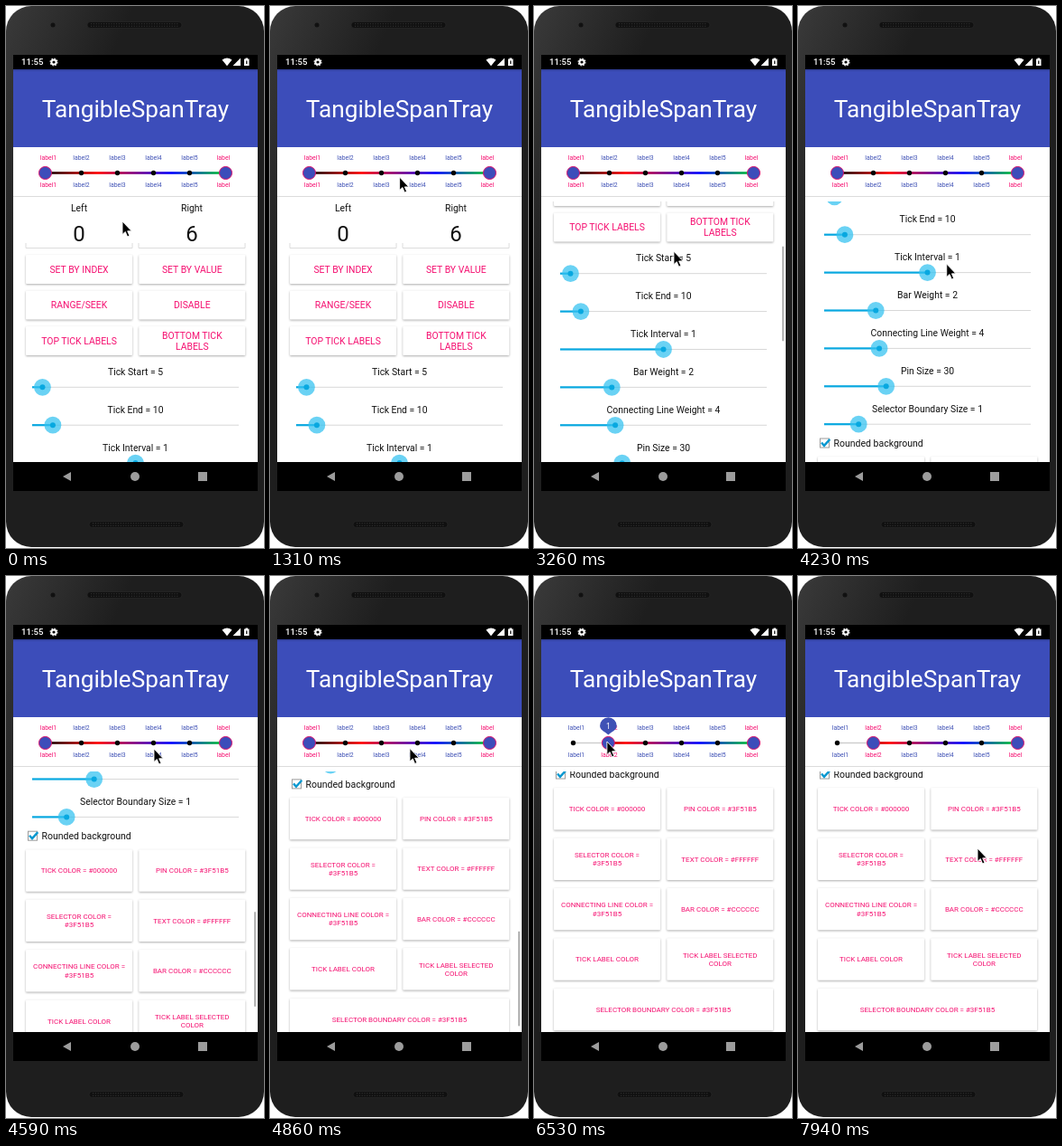
Recreate the animation shown at these times as an HTML page. Size 286 by 599 pixels, loop 8000 ms.

```html
<!DOCTYPE html>
<html lang="en">
<head>
<meta charset="utf-8">
<title>Range slider demo</title>
<style>
html, body { margin: 0; width: 100%; height: 100%; overflow: hidden; background: #fff; }
svg { display: block; width: 286px; height: 599px; font-family: Roboto, "Liberation Sans", sans-serif; }
.card { fill: #fff; filter: drop-shadow(0 1px 1px rgba(0, 0, 0, .32)); }
.ink { fill: #111; }
.pink { fill: #f50f70; }
.blue { fill: #3f51b5; }
.header { fill: #3c4dba; }
.white { fill: #fff; }
.cyan { fill: #08a8e0; }
.nav { fill: #9c9c9c; }
</style>
</head>
<body>
<svg id="stage" viewBox="0 0 286 599" xmlns="http://www.w3.org/2000/svg"></svg>
<script>
const LOOP = 8000;
const BEAT = 88.2;
const BAR_Y = 184.5, BAR_LEFT = 43.5, TICK_GAP = 40;
const VIEW_TOP = 216, VIEW_BOTTOM = 504;

// Times below are in beats.
const flings = [
  { start: 18, length: 4, distance: 110.5 },
  { start: 36.7, length: 5, distance: 100 },
  { start: 48, length: 10, distance: 264 }
];

// Each glide: start, end, then the point it reaches.
const glides = [
  [0, 2, 138, 263], [4, 5, 137, 259], [9, 16, 144, 185], [18, 22, 144.5, 112],
  [25, 34, 158, 353], [35, 38.5, 153, 218], [40, 46, 165, 318], [46, 52, 164, 191],
  [54, 60, 42, 183], [65, 75, 82, 183], [82, 86, 250, 192], [87, 90, 199, 301]
];

const clamp = (v, lo, hi) => Math.min(hi, Math.max(lo, v));
const ramp = (t, from, to) => clamp((t - from) / (to - from), 0, 1);
const smooth = p => p * p * (3 - 2 * p);
const decelerate = p => 1 - (1 - p) ** 2.65;

function cursorAt(t) {
  let x = 129, y = 238;
  for (const [from, to, toX, toY] of glides) {
    const p = smooth(ramp(t, from, to));
    x += (toX - x) * p;
    y += (toY - y) * p;
  }
  return [x, y];
}

const scrollAt = t => flings.reduce((sum, f) =>
  sum + f.distance * decelerate(ramp(t, f.start, f.start + f.length)), 0);

// The scrollbar shows during a fling, lingers, then fades.
function scrollbarAt(t) {
  const f = flings.findLast(f => t > f.start);
  if (!f) return 0;
  const end = f.start + f.length;
  return 1 - ramp(t, end + 3, end + 6);
}

// y is the middle of the capitals
const text = (x, y, str, size, cls, extra = 'text-anchor="middle"') =>
  `<text x="${x}" y="${y + size * 0.36}" font-size="${size}" class="${cls}" ${extra}>${str}</text>`;

const rect = (x, y, w, h, attrs) =>
  `<rect x="${x}" y="${y}" width="${w}" height="${h}" ${attrs}/>`;

const circle = (x, y, r, attrs) => `<circle cx="${x}" cy="${y}" r="${r}" ${attrs}/>`;

const range = n => [...Array(n).keys()];

function button(x, y, w, h, label, size) {
  const lines = label.split('|');
  const gap = size * 1.17;
  return rect(x, y, w, h, 'rx="1" class="card"') + lines.map((line, i) =>
    text(x + w / 2, y + h / 2 + (i - (lines.length - 1) / 2) * gap, line, size, 'pink')).join('');
}

const buttonRow = (labels, y, h, size) =>
  labels.map((s, i) => button(22 + 125.3 * i, y, 118, h, s, size)).join('');

function seek([name, value, max], i) {
  const y = 421.3 + 41.9 * i;
  const filled = 229 * value / max;
  return text(143.5, y - 17, `${name} = ${value}`, 10.4, 'ink') +
    rect(29, y - 0.5, 229, 1, 'fill="#d8d8d8"') +
    rect(29, y - 1.1, filled, 2.2, 'class="cyan"') +
    circle(29 + filled, y, 9.4, 'fill="#30c0f0" fill-opacity=".72"') +
    circle(29 + filled, y, 3, 'class="cyan"');
}

function numberBox(x, label, value) {
  return `<path d="M${x - 59} 262V267.5H${x + 59}V262" fill="none" stroke="#dcdcdc"/>` +
    text(x, 223.5, label, 10.4, 'ink') + text(x, 251.5, value, 24, 'ink');
}

function scrollContent() {
  const actions = [['SET BY INDEX', 'SET BY VALUE'], ['RANGE/SEEK', 'DISABLE'],
    ['TOP TICK LABELS', 'BOTTOM TICK|LABELS']];
  const sliders = [['Tick Start', 5, 100], ['Tick End', 10, 100], ['Tick Interval', 1, 2],
    ['Bar Weight', 2, 8], ['Connecting Line Weight', 4, 15], ['Pin Size', 30, 100],
    ['Selector Boundary Size', 1, 6]];
  const colours = [['TICK COLOR = #000000', 'PIN COLOR = #3F51B5'],
    ['SELECTOR COLOR =|#3F51B5', 'TEXT COLOR = #FFFFFF'],
    ['CONNECTING LINE COLOR =|#3F51B5', 'BAR COLOR = #CCCCCC'],
    ['TICK LABEL COLOR', 'TICK LABEL SELECTED|COLOR']];
  return numberBox(81, 'Left', 0) + numberBox(206, 'Right', 6) +
    actions.map((r, i) => buttonRow(r, 275 + 39.5 * i, 32, 10.4)).join('') +
    sliders.map(seek).join('') +
    rect(24.5, 688.5, 10, 10, 'fill="#fff" stroke="#9a9a9a"') +
    '<path d="M26 693l3 3.4 6.3-7" fill="none" stroke="#0a98d0" stroke-width="2.4"/>' +
    text(39.5, 694, 'Rounded background', 10.5, 'ink', '') +
    colours.map((r, i) => buttonRow(r, 708.5 + 55.4 * i, 46.5, 8)).join('') +
    button(22, 930.3, 243, 46.5, 'SELECTOR BOUNDARY COLOR = #3F51B5', 8);
}

function grille(x, y) {
  return rect(x, y - 3.5, 105, 7, 'rx="3.5" fill="#101010" stroke="#2c2c2c" stroke-width=".6"') +
    [-1.3, 1.3].map(d => `<path d="M${x + 4} ${y + d}h97" stroke="#343434" stroke-dasharray="1.2 1.6"/>`).join('');
}

function statusBar() {
  return text(17, 62, '11:55', 9.6, 'white', 'font-weight="500"') +
    circle(53, 62, 2.6, 'fill="none" stroke="#fff" stroke-width="2"') +
    circle(53, 62, 3.9, 'fill="none" stroke="#fff" stroke-width="1.2" stroke-dasharray="1.5 1.56"') +
    '<path class="white" d="M239.5 59.5Q245 55.5 250.5 59.5L245 66.3ZM260 57.5V66H251.5Z' +
    'M264 58.5h1.5v-1H268v1h1.5V66H264Z"/>' +
    rect(266.2, 60.5, 1.2, 3.5, 'fill="#000"');
}

function phone() {
  return rect(0, 0, 286, 598, 'rx="28" fill="url(#shell)"') +
    circle(52, 21, 2.5, 'fill="#111"') + grille(90, 21) + grille(92, 573) +
    rect(8, 54, 271, 482, 'fill="#000"') + statusBar() +
    rect(8, 70, 271, 86, 'class="header"') + rect(8, 70, 271, 2, 'fill="#3443a4"') +
    text(143.5, 114, 'TangibleSpanTray', 26.2, 'white') +
    rect(8, 156, 271, VIEW_BOTTOM - 156, 'class="white"') +
    rect(8, 210, 271, 1, 'fill="#dcdcdc"') +
    '<path d="M63 520L72 515V525Z" class="nav"/>' +
    circle(143, 520, 5, 'class="nav"') + rect(213, 515, 10, 10, 'class="nav"');
}

function tickLabel(i) {
  const x = clamp(BAR_LEFT + TICK_GAP * i, 47, 241);
  const name = i < 5 ? `label${i + 1}` : 'label';
  return `<g class="label">${[168, 197.5].map(y => text(x, y, name, 6.9, '')).join('')}</g>`;
}

function rangeBar() {
  const knob = circle(0, 0, 7, 'class="header" stroke="#e0106c"');
  const right = BAR_LEFT + 5 * TICK_GAP;
  return range(6).map(tickLabel).join('') +
    rect(BAR_LEFT, BAR_Y - 0.7, 5 * TICK_GAP, 1.4, 'fill="#ccc"') +
    `<rect id="link" y="${BAR_Y - 1.3}" height="2.6" fill="url(#spectrum)"/>` +
    range(6).map(i => circle(BAR_LEFT + TICK_GAP * i, BAR_Y, 2.7, '')).join('') +
    `<g transform="translate(${right} ${BAR_Y})">${knob}</g>
    <g id="thumb">${knob}<g id="pin">
      <path class="blue" d="M0-9C-4-13-9.3-14-9.3-19A9.3 9.3 0 1 1 9.3-19C9.3-14 4-13 0-9Z"/>
      <text id="pinText" y="-16" font-size="8.5" class="white" text-anchor="middle">0</text>
    </g></g>`;
}

document.getElementById('stage').innerHTML = `
  <defs>
    <clipPath id="view">${rect(8, VIEW_TOP, 271, VIEW_BOTTOM - VIEW_TOP, '')}</clipPath>
    <linearGradient id="shell" gradientUnits="userSpaceOnUse" x1="0" y1="0" x2="120" y2="50">
      <stop stop-color="#3a3a3a"/><stop offset="1" stop-color="#1e1e1e"/>
    </linearGradient>
    <linearGradient id="spectrum" gradientUnits="userSpaceOnUse" x1="43.5" x2="243.5">
      <stop stop-color="#000"/><stop offset=".29" stop-color="#f00"/>
      <stop offset=".7" stop-color="#00f"/><stop offset="1" stop-color="#00d020"/>
    </linearGradient>
  </defs>
  ${phone()}
  <g clip-path="url(#view)"><g id="content">${scrollContent()}</g></g>
  ${rect(275, 0, 2, 104.5, 'id="scrollbar" fill="#b4b4b4"')}
  ${rangeBar()}
  <path id="cursor" d="M0 0V14.5L3.3 11.5 5.6 17 8 16 5.7 10.8H10.3Z" stroke="#fff" stroke-width=".9"/>`;

const el = id => document.getElementById(id);
const labels = [...document.querySelectorAll('.label')];
const move = (id, x, y, scale = 1) =>
  el(id).setAttribute('transform', `translate(${x} ${y}) scale(${scale})`);

function draw(ms) {
  const t = Math.floor((ms + 22) / BEAT);
  const scroll = scrollAt(t);
  const dragged = smooth(ramp(t, 65, 75));
  const x = BAR_LEFT + TICK_GAP * dragged;
  const selected = Math.round(dragged);

  move('cursor', ...cursorAt(t));
  move('content', 0, -scroll);
  move('scrollbar', 0, 218.5 + scroll * 0.376);
  el('scrollbar').setAttribute('opacity', scrollbarAt(t));
  move('thumb', x, BAR_Y);
  move('pin', 0, 0, ramp(t, 61, 64) - ramp(t, 76, 79));
  el('pinText').textContent = selected;
  el('link').setAttribute('x', x);
  el('link').setAttribute('width', BAR_LEFT + 5 * TICK_GAP - x);
  labels.forEach((g, i) => g.setAttribute('class', i === selected || i === 5 ? 'pink' : 'blue'));
}

const start = performance.now();
function loop() {
  draw((performance.now() - start) % LOOP);
  requestAnimationFrame(loop);
}
loop();
</script>
</body>
</html>
```
